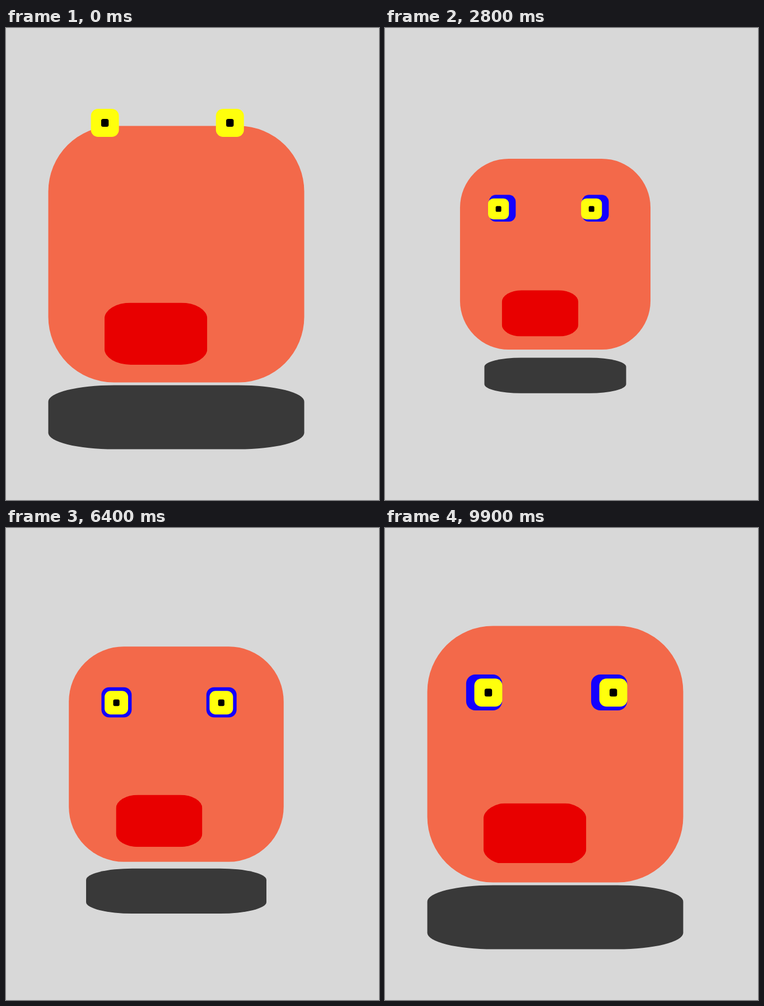
An HTML page with a canvas that plays this animation: 666 by 841 pixels, repeating every 10 s.

```html
<!DOCTYPE html>
<html lang="en">
<head>
<meta charset="utf-8">
<title>Bobbing head</title>
<style>
  html, body { margin: 0; width: 100%; height: 100%; overflow: hidden; background: #d8d8d8; }
  canvas { display: block; width: 666px; height: 841px; }
</style>
</head>
<body>
<canvas id="stage"></canvas>
<script>
const W = 666, H = 841;
const LOOP = 10000, STEP = 100;
const EYE_LOOP = 6000, MOUTH_LOOP = 8000;
const CORNER = 0.256;
const COLOR = {
  back: '#d8d8d8', head: '#f3694a', base: '#393939', mouth: '#e80000',
  eye: '#1400ff', iris: '#ffff0c', pupil: '#000'
};

const canvas = document.getElementById('stage');
const ratio = window.devicePixelRatio || 1;
canvas.width = W * ratio;
canvas.height = H * ratio;
const ctx = canvas.getContext('2d');

// CSS "ease": cubic-bezier(.25, .1, .25, 1)
function ease(x) {
  if (x <= 0) return 0;
  if (x >= 1) return 1;
  let lo = 0, hi = 1;
  for (let i = 0; i < 24; i++) {
    const s = (lo + hi) / 2;
    if (0.75 * s * (1 - s) + s * s * s < x) lo = s; else hi = s;
  }
  const s = lo, r = 1 - s;
  return 0.3 * s * r * r + 3 * s * s * r + s * s * s;
}

// Value at time t from rows of [time, ...values], eased between rows
function track(rows, t) {
  let i = 0;
  while (i < rows.length - 1 && rows[i + 1][0] <= t) i++;
  const a = rows[i], b = rows[i + 1] || a;
  const k = a === b ? 0 : ease((t - a[0]) / (b[0] - a[0]));
  return a.slice(1).map((v, n) => v + (b[n + 1] - v) * k);
}

const SCALE = [[0, 1], [5000, 0.7], [10000, 1]];
const MOUTH = [[0, 1], [800, 1], [1200, 0], [1600, 0], [2000, 1]];
const BLINK_END = 250, BLINK_Y = -124;
const GAZE = [
  [0, -0.4, 0.7], [2000, -0.4, 0.7],
  [2400, -9.2, 1.7], [3200, -9.2, 1.7],
  [3600, 7.5, 0.3], [4400, 7.5, 0.3],
  [4800, -9.3, -10], [6000, -9.3, -10]
];

// Rounded box around a centre, corners proportional to each side
function box(x, y, w, h, color) {
  const rx = w * CORNER, ry = h * CORNER;
  const l = x - w / 2, r = x + w / 2, t = y - h / 2, b = y + h / 2;
  const q = Math.PI / 2;
  ctx.beginPath();
  ctx.ellipse(l + rx, t + ry, rx, ry, 0, 2 * q, 3 * q);
  ctx.ellipse(r - rx, t + ry, rx, ry, 0, 3 * q, 4 * q);
  ctx.ellipse(r - rx, b - ry, rx, ry, 0, 0, q);
  ctx.ellipse(l + rx, b - ry, rx, ry, 0, q, 2 * q);
  ctx.closePath();
  ctx.fillStyle = color;
  ctx.fill();
}

function drawMouth(open) {
  if (open <= 0) return;
  const x = -36.4, y = 141.7, w = 183.5, h = 110.5;
  const hidden = h * (1 - open);
  ctx.save();
  ctx.beginPath();
  ctx.rect(x - w / 2, y - h / 2 + hidden * 0.32, w, h - hidden);
  ctx.clip();
  box(x, y, w, h, COLOR.mouth);
  ctx.restore();
}

function drawEye(x, phase) {
  const y = -110, blink = phase < BLINK_END;
  const [gx, gy] = track(GAZE, phase);
  if (!blink) box(x, y, 64.3, 64, COLOR.eye);
  const ix = x + gx, iy = y + (blink ? BLINK_Y : gy);
  box(ix, iy, 50, 50, COLOR.iris);
  box(ix, iy, 13.4, 14, COLOR.pupil);
}

function draw(t) {
  const [s] = track(SCALE, Math.max(0, t - 20));
  ctx.setTransform(ratio, 0, 0, ratio, 0, 0);
  ctx.fillStyle = COLOR.back;
  ctx.fillRect(0, 0, W, H);
  ctx.translate(304, 403);
  ctx.scale(s, s);
  box(0, 290.5, 457 * s, 114 * s, COLOR.base);
  box(0, 0, 457, 457, COLOR.head);
  drawMouth(track(MOUTH, t % MOUTH_LOOP)[0]);
  for (const x of [-127, 96.2]) drawEye(x, t % EYE_LOOP);
}

const start = performance.now();
function tick() {
  const t = (performance.now() - start) % LOOP;
  draw(Math.floor(t / STEP) * STEP);
  requestAnimationFrame(tick);
}
tick();
</script>
</body>
</html>
```
